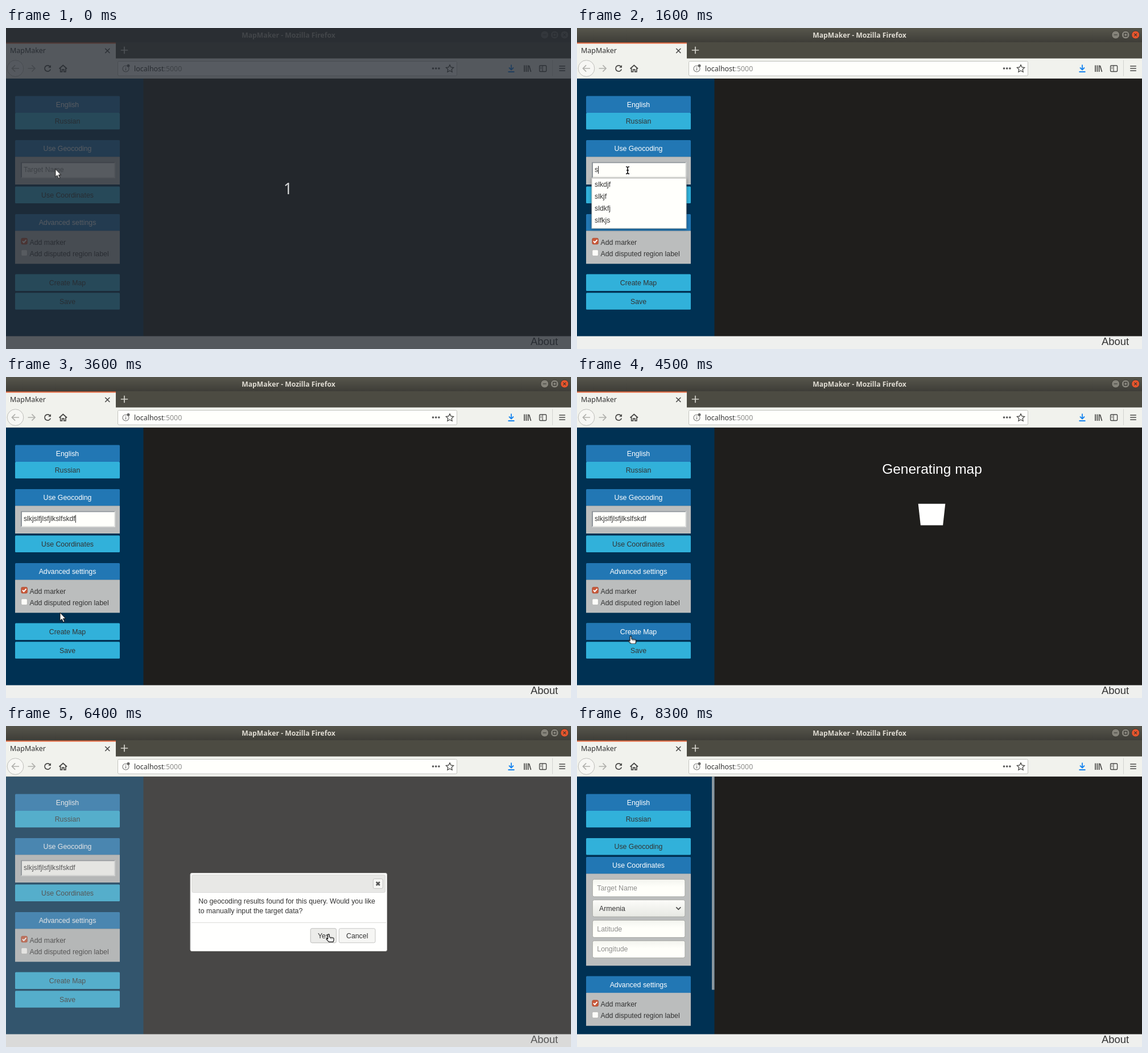
Write an HTML page that moves like this. It is 993x564 px and loops after 8.4 s.

```html
<!DOCTYPE html>
<html lang="en">
<head>
<meta charset="utf-8">
<title>MapMaker</title>
<style>
html, body { margin: 0; width: 100%; height: 100%; overflow: hidden; background: #1f1e1c; }
svg { position: absolute; inset: 0; width: 100%; height: 100%; display: block; }
text { font: 12.33px "Liberation Sans", Arial, sans-serif; fill: #333; white-space: pre; }
.ui text { font: 12.45px "Noto Sans", "Open Sans", sans-serif; }
.ui .title { font-size: 12.2px; font-weight: 700; fill: #dfdbd2; text-anchor: middle; }
.line { fill: none; stroke: #4a4a48; stroke-width: 1.7; }
.mid text, text.mid { text-anchor: middle; }
.teal rect { fill: #31b1da; }
.blue rect { fill: #2277b4; }
.blue text { fill: #fff; }
.hint { fill: #8c8c8a; }
.typed { font-size: 12.2px; }
.field { fill: url(#fieldFill); stroke: #a9aaa6; }

/* one shared clock: every change is a hard cut on the 8.4 s loop */
.t, #spin { animation: 8400ms step-end infinite; opacity: 0; }
#cursor, #pen { animation: 8400ms step-end infinite; }
#count { animation-name: count; }
#inactive { animation-name: inactive; }
#hint { animation-name: hint; }
#caret { animation-name: caret; }
#popup { animation-name: popup; }
#hover { animation-name: hover; }
#busy { animation-name: busy; }
#spin { animation-name: busy, flip; animation-duration: 8400ms; }
#dialog { animation-name: dialog; }
#yes { animation-name: yes; }
#geo { animation-name: geo; }
#coords { animation-name: coords; }
#focus { animation-name: focus; }
#arrow { animation-name: arrow; }
#beam { animation-name: beam; }
#hand { animation-name: hand; }
#pen { animation-name: type; }
#cursor { animation-name: travel; }

@keyframes count { 0% { opacity: 1 } 5.952% { opacity: 0 } }
@keyframes inactive { 0% { opacity: 1 } 7.142% { opacity: 0 } }
@keyframes hint { 0% { opacity: 1 } 19.047% { opacity: 0 } }
@keyframes caret { 0% { opacity: 0 } 5.952% { opacity: 1 } 48.809% { opacity: 0 } }
@keyframes popup { 0% { opacity: 0 } 19.047% { opacity: 1 } 21.428% { opacity: 0 } }
@keyframes hover { 0% { opacity: 0 } 44.047% { opacity: 1 } 54.761% { opacity: 0 } }
@keyframes busy { 0% { opacity: 0 } 48.809% { opacity: 1 } 54.761% { opacity: 0 } }
@keyframes dialog { 0% { opacity: 0 } 54.761% { opacity: 1 } 77.38% { opacity: 0 } }
@keyframes yes { 0% { opacity: 0 } 71.428% { opacity: 1 } 77.38% { opacity: 0 } }
@keyframes geo { 0% { opacity: 1 } 77.38% { opacity: 0 } }
@keyframes coords { 0% { opacity: 0 } 77.38% { opacity: 1 } }
@keyframes coords { 0% { opacity: 0 } 77.38%, 100% { opacity: 1 } }
@keyframes focus { 0% { opacity: 0 } 77.38% { opacity: 1 } 98.809% { opacity: 0 } }
@keyframes beam { 0% { opacity: 0 } 5.952% { opacity: 1 } 39.285% { opacity: 0 } }
@keyframes hand {
  0% { opacity: 0 } 44.047% { opacity: 1 } 54.761% { opacity: 0 }
  71.428% { opacity: 1 } 77.38% { opacity: 0 }
}
@keyframes arrow {
  0% { opacity: 1 } 5.952% { opacity: 0 }
  39.285% { opacity: 1 } 44.047% { opacity: 0 }
  54.761% { opacity: 1 } 71.428% { opacity: 0 }
  77.38% { opacity: 1 } 92.857% { opacity: 0 }
}
@keyframes type {
  0% { transform: none }
  19.047% { transform: translateX(6.1px) }
  20.238% { transform: translateX(14.9px) }
  21.428% { transform: translateX(17.6px) }
  22.619% { transform: translateX(29.8px) }
  25% { transform: translateX(32.5px) }
  26.19% { transform: translateX(41.3px) }
  27.38% { transform: translateX(47.4px) }
  29.761% { transform: translateX(62.3px) }
  30.952% { transform: translateX(68.4px) }
  32.142% { transform: translateX(87.4px) }
  34.523%, 100% { transform: translateX(90.8px) }
}
@keyframes travel {
  0% { transform: translate(86.8px, 247.6px) }
  5.952% { transform: translate(89px, 250px) }
  39.285% { transform: translate(92px, 309px) }
  40.476% { transform: translate(95px, 383px) }
  42.857% { transform: translate(95px, 414px) }
  44.047% { transform: translate(94px, 444px) }
  45.238% { transform: translate(94.5px, 455.5px) }
  54.761% { transform: translate(93px, 454.5px) }
  60.714% { transform: translate(150px, 430px) }
  61.904% { transform: translate(258px, 386px) }
  63.095% { transform: translate(330px, 360px) }
  66.666% { transform: translate(372px, 343px) }
  67.857% { transform: translate(436px, 326px) }
  69.047% { transform: translate(492px, 325px) }
  70.238% { transform: translate(531px, 341px) }
  71.428% { transform: translate(558px, 359px) }
  72.619% { transform: translate(567px, 366px) }
  77.38% { transform: translate(566.6px, 367.6px) }
  83.333% { transform: translate(480px, 285px) }
  84.523% { transform: translate(372px, 204px) }
  85.714% { transform: translate(290px, 275px) }
  88.095% { transform: translate(262px, 225px) }
  89.285% { transform: translate(212px, 150px) }
  90.476% { transform: translate(125px, 94px) }
  91.666%, 100% { transform: translate(36px, 29px) }
}
/* plane flips about X, then about Y */
@keyframes flip {
  0% { transform: none }
  48.809% { transform: perspective(111px) rotateX(-180deg) rotateY(-124deg) }
  50% { transform: perspective(111px) rotateX(-180deg) rotateY(-162deg) }
  51.19% { transform: perspective(111px) rotateX(-180deg) rotateY(-179deg) }
  52.38% { transform: perspective(111px) rotateX(-5deg) }
  53.571%, 100% { transform: perspective(111px) rotateX(-30deg) }
}
#spin { position: absolute; left: 602.35px; top: 222px; width: 43.3px; height: 43.3px; background: #fffffe; }
</style>
</head>
<body>
<svg viewBox="0 0 993 564">
  <defs>
    <linearGradient id="bar" x2="0" y2="1"><stop stop-color="#57564c"/><stop offset="1" stop-color="#3d3c37"/></linearGradient>
    <linearGradient id="fieldFill" x2="0" y2="1"><stop stop-color="#f3f4ef"/><stop offset=".45" stop-color="#fffffa"/></linearGradient>
    <linearGradient id="selectFill" x2="0" y2="1"><stop stop-color="#fcfcf9"/><stop offset="1" stop-color="#e7e8e3"/></linearGradient>
    <filter id="shadow"><feDropShadow dx="0" dy="1" stdDeviation="2.5" flood-opacity=".4"/></filter>
    <clipPath id="inside"><rect x="28" y="237.5" width="162" height="24"/></clipPath>
    <g id="advanced">
      <g class="blue mid"><rect x="16" y="327" width="184" height="29.5" rx="1.5"/><text x="108" y="346">Advanced settings</text></g>
      <rect x="16" y="356.3" width="184" height="58" fill="#bbbdbd"/>
      <rect x="26.8" y="369.3" width="10.6" height="10.6" rx="2" fill="#c9593a" stroke="#a9492f" stroke-width=".8"/>
      <path d="M29 374.5l2.3 2.5 4.3-4.8" fill="none" stroke="#fff" stroke-width="1.9"/>
      <rect x="26.8" y="389.8" width="10.6" height="10.6" rx="2" fill="#fcfcf9" stroke="#a9aaa8" stroke-width=".7"/>
      <text x="41.5" y="380.5">Add marker</text>
      <text x="41.5" y="400.5">Add disputed region label</text>
    </g>
  </defs>

  <!-- browser window -->
  <g class="ui">
    <rect width="993" height="26" fill="url(#bar)"/>
    <text class="title" x="496.5" y="16.6">MapMaker - Mozilla Firefox</text>
    <g stroke="#35342f" stroke-width=".8">
      <circle cx="946.7" cy="12" r="7" fill="#85837a"/>
      <circle cx="964.2" cy="12" r="7" fill="#85837a"/>
      <circle cx="981.7" cy="12" r="7" fill="#e6552d"/>
      <path d="M943.7 12h6M961.6 9.4h5.2v5.2h-5.2ZM979.3 9.6l4.8 4.8m0-4.8l-4.8 4.8" fill="none" stroke-width="1.1"/>
    </g>
    <g id="inactive" class="t">
      <rect width="993" height="26" fill="#3e3d38"/>
      <text class="title" x="496.5" y="16.6" style="fill:#a3a097">MapMaker - Mozilla Firefox</text>
      <g fill="#66655e" stroke="#33322e" stroke-width=".8">
        <circle cx="946.7" cy="12" r="7"/><circle cx="964.2" cy="12" r="7"/><circle cx="981.7" cy="12" r="7"/>
        <path d="M943.7 12h6M961.6 9.4h5.2v5.2h-5.2ZM979.3 9.6l4.8 4.8m0-4.8l-4.8 4.8" fill="none" stroke-width="1.1"/>
      </g>
    </g>
    <rect y="25" width="993" height="29" fill="#4c4b42"/>
    <rect y="53.5" width="993" height="35.5" fill="#f1f2ed"/>
    <rect y="26" width="193" height="28" fill="#f1f2ed"/>
    <rect y="25.5" width="193" height="2" fill="#e5683f"/>
    <rect y="88" width="993" height="1" fill="#c8c9c5"/>
    <text x="7" y="44.2">MapMaker</text>
    <path class="line" d="M174.3 36l8 8m0-8l-8 8" stroke-width="1.5"/>
    <path d="M201.8 39h12.4M208 32.8v12.4" stroke="#d4d3cc" stroke-width="1.7"/>
    <circle cx="16.5" cy="71" r="14.3" fill="#f7f7f4" stroke="#bdbdb9"/>
    <g class="line">
      <path d="M23 71H10.5m5.6-5.6L10.5 71l5.6 5.6M38.5 71H51m-5.6-5.6L51 71l-5.6 5.6" stroke="#b1b1ad"/>
      <path d="M77.3 67.8a5.2 5.2 0 1 0 .9 4.6"/>
      <path d="M79 65v4.8h-4.8Z" fill="#4a4a48" stroke="none"/>
      <path d="M93.5 71.5l6.8-6 6.8 6M95.7 70.5v6.3h3v-3.6h3.2v3.6h3v-6.3"/>
    </g>
    <rect x="196.5" y="58.5" width="596" height="25.5" rx="2" fill="#fffffc" stroke="#c2c3bf"/>
    <circle class="line" cx="210.5" cy="71.5" r="5.5" style="stroke:#777;stroke-width:1.1"/>
    <path d="M210.5 70.5v4M210.5 68v1.3" stroke="#777" stroke-width="1.3"/>
    <circle cx="215" cy="66.3" r="2.5" fill="#666"/>
    <text x="225" y="76">localhost<tspan fill="#8b8b89">:5000</tspan></text>
    <g fill="#555"><circle cx="750.5" cy="71" r="1.8"/><circle cx="755.7" cy="71" r="1.8"/><circle cx="760.9" cy="71" r="1.8"/></g>
    <path class="line" d="M780 64.7l2 4.2 4.6.6-3.4 3.2.9 4.6-4.1-2.3-4.1 2.3.9-4.6-3.4-3.2 4.6-.6Z" style="stroke-width:1.3"/>
    <path d="M888 64.5v9m-4-4l4 4 4-4M882.5 77h11" fill="none" stroke="#1583ef" stroke-width="1.8"/>
    <path class="line" d="M911 65.5v11.5M914.3 65.5v11.5M917.6 65.5v11.5M919.3 66l3.2 11"/>
    <rect class="line" x="937.6" y="66" width="12" height="10.5" rx="1.5" style="stroke-width:1.4"/>
    <path class="line" d="M943 66v10.5M939.3 69h2M939.3 71.3h2" style="stroke-width:1.1"/>
    <path d="M960.5 56.5v28" stroke="#d2d3cf"/>
    <path class="line" d="M972.2 67h10.6M972.2 71h10.6M972.2 75h10.6"/>
  </g>

  <!-- page -->
  <rect y="89" width="993" height="453" fill="#1f1e1c"/>
  <rect y="89" width="241.5" height="453" fill="#003153"/>
  <rect y="541.5" width="993" height="22.5" fill="#eff0ee"/>
  <text x="922" y="557" style="font-size:18.4px">About</text>
  <g class="blue mid"><rect x="16" y="119.5" width="184" height="29.7" rx="1.5"/><text x="108" y="138.5">English</text></g>
  <g class="teal mid"><rect x="16" y="149" width="184" height="29.3" rx="1.5"/><text x="108" y="168">Russian</text></g>

  <g id="geo" class="t">
    <g class="blue mid"><rect x="16" y="197" width="184" height="29.5" rx="1.5"/><text x="108" y="216.3">Use Geocoding</text></g>
    <rect x="16" y="226.3" width="184" height="48.7" fill="#bbbdbd"/>
    <rect x="26" y="235.5" width="166" height="28.3" fill="#e3e4e2"/>
    <path d="M26 263.8V235.5H192l-2 2H28v24.3Z" fill="#8d9398"/>
    <rect x="28" y="237.5" width="162" height="24.3" fill="#fffffb"/>
    <g clip-path="url(#inside)">
      <text class="typed" x="31" y="253.3">slkjslfjlsfjlkslfskdf</text>
      <g id="pen">
        <rect x="31" y="238" width="162" height="23.5" fill="#fffffb"/>
        <rect id="caret" class="t" x="31" y="242.5" width="1" height="13.5" fill="#222"/>
      </g>
      <text id="hint" class="t hint" x="31" y="253.3">Target Name</text>
    </g>
    <g class="teal mid">
      <rect x="16" y="278.5" width="184" height="29.5" rx="1.5"/><text x="108" y="297.6">Use Coordinates</text>
      <rect x="16" y="432.5" width="184" height="29.5" rx="1.5"/><text x="108" y="451.6">Create Map</text>
      <rect x="16" y="465.2" width="184" height="29.5" rx="1.5"/><text x="108" y="484.5">Save</text>
    </g>
    <g id="hover" class="t blue mid"><rect x="16" y="432.5" width="184" height="29.5" rx="1.5"/><text x="108" y="451.6">Create Map</text></g>
    <use href="#advanced"/>
    <g id="popup" class="t">
      <rect x="26" y="264" width="166" height="88" fill="#fffffc" stroke="#c4c4c0" filter="url(#shadow)"/>
      <text x="31" y="279">slkdjf</text><text x="31" y="300">slkjf</text>
      <text x="31" y="321">sldkfj</text><text x="31" y="342">slfkjs</text>
    </g>
  </g>

  <g id="coords" class="t">
    <g class="teal mid"><rect x="16" y="197" width="184" height="29.5" rx="1.5"/><text x="108" y="216.3">Use Geocoding</text></g>
    <g class="blue mid"><rect x="16" y="230" width="184" height="29.7" rx="1.5"/><text x="108" y="249">Use Coordinates</text></g>
    <rect x="16" y="259.5" width="184" height="161.7" fill="#bbbdbd"/>
    <rect class="field" x="27.3" y="269.3" width="162.6" height="30.6" rx="3"/>
    <rect class="field" x="27.3" y="305.6" width="162.6" height="29.6" rx="3" style="fill:url(#selectFill)"/>
    <rect class="field" x="27.3" y="341.3" width="162.6" height="30.3" rx="3"/>
    <rect class="field" x="27.3" y="377.3" width="162.6" height="30" rx="3"/>
    <text x="39" y="325.3">Armenia</text>
    <path class="line" d="M174.3 318.3l4 4 4-4"/>
    <rect x="237" y="89" width="4.5" height="374.5" fill="#8b979f"/>
    <g id="focus" class="t">
      <rect class="field" x="27.3" y="269.3" width="162.6" height="30.6" rx="3" style="stroke:#dd9573"/>
      <rect x="35" y="278" width="1" height="13.5" fill="#222"/>
      <rect x="237" y="89" width="4.5" height="374.5" fill="#ab5c46"/>
    </g>
    <text class="hint" x="35.3" y="289">Target Name</text>
    <text class="hint" x="35.3" y="360.7">Latitude</text>
    <text class="hint" x="35.3" y="396.3">Longitude</text>
    <use href="#advanced" y="112.5"/>
  </g>

  <g id="busy" class="t"><text class="mid" x="624" y="169.5" style="font-size:24.5px;fill:#fff">Generating map</text></g>

  <g id="dialog" class="t">
    <rect y="89" width="993" height="475" fill="#aaa" opacity=".3"/>
    <rect x="324" y="258.5" width="345.5" height="137" rx="2.5" fill="#fffffe" stroke="#c9c9c7"/>
    <rect x="326.8" y="261.5" width="339.8" height="31" rx="2.5" fill="#e8e8e6" stroke="#dadad8"/>
    <rect x="645.3" y="268.5" width="17" height="17" rx="2.5" fill="#f6f6f4" stroke="#c5c5c3"/>
    <path d="M650.8 274l6 6m0-6l-6 6" stroke="#555" stroke-width="2.6"/>
    <text x="338.3" y="311.7">No geocoding results found for this query. Would you like</text>
    <text x="338.3" y="328.7">to manually input the target data?</text>
    <path d="M326 345.5h342" stroke="#dcdcda"/>
    <g class="mid" fill="#f6f6f4" stroke="#c5c5c3">
      <rect x="535.3" y="355.8" width="45.2" height="25" rx="2.5"/>
      <rect x="585.3" y="355.8" width="63.7" height="25" rx="2.5"/>
      <rect id="yes" class="t" x="535.3" y="355.8" width="45.2" height="25" rx="2.5" fill="#ececea"/>
      <g stroke="none"><text x="558" y="372.8">Yes</text><text x="617.2" y="372.8">Cancel</text></g>
    </g>
  </g>

  <g id="count" class="t ui">
    <rect width="993" height="564" fill="#252a32" opacity=".77"/>
    <text class="mid" x="495.5" y="292" style="font-size:26.5px;fill:#d8d9da">1</text>
  </g>

  <g id="cursor" stroke-linejoin="round">
    <path id="arrow" class="t" d="M0 0V14.2L3.2 11.3 5.6 16.8 7.9 15.8 5.5 10.5H9.8Z" fill="#fff" stroke="#111"/>
    <g id="beam" class="t" fill="none">
      <path d="M-3-6.3Q0-6.3 0-4.3V4.3Q0 6.3-3 6.3M3-6.3Q0-6.3 0-4.3M0 4.3Q0 6.3 3 6.3M-2 0H2" stroke="#fff" stroke-width="3.4"/>
      <path d="M-3-6.3Q0-6.3 0-4.3V4.3Q0 6.3-3 6.3M3-6.3Q0-6.3 0-4.3M0 4.3Q0 6.3 3 6.3M-2 0H2" stroke="#111" stroke-width="1.6"/>
    </g>
    <g id="hand" class="t">
      <path d="M-1.4 1.3a1.4 1.4 0 0 1 2.8 0V5L7.6 6Q9 6.4 9 7.8V10.4L8 13.4H.6L-3.8 8.9Q-4.2 7.2-2.7 7.3L-1.4 8.3Z" fill="#fff" stroke="#111" stroke-width="1.2"/>
      <path d="M3.3 6v2.2M5.8 6.5v2" stroke="#111" stroke-width=".8"/>
    </g>
  </g>
</svg>
<div id="spin"></div>
</body>
</html>
```
